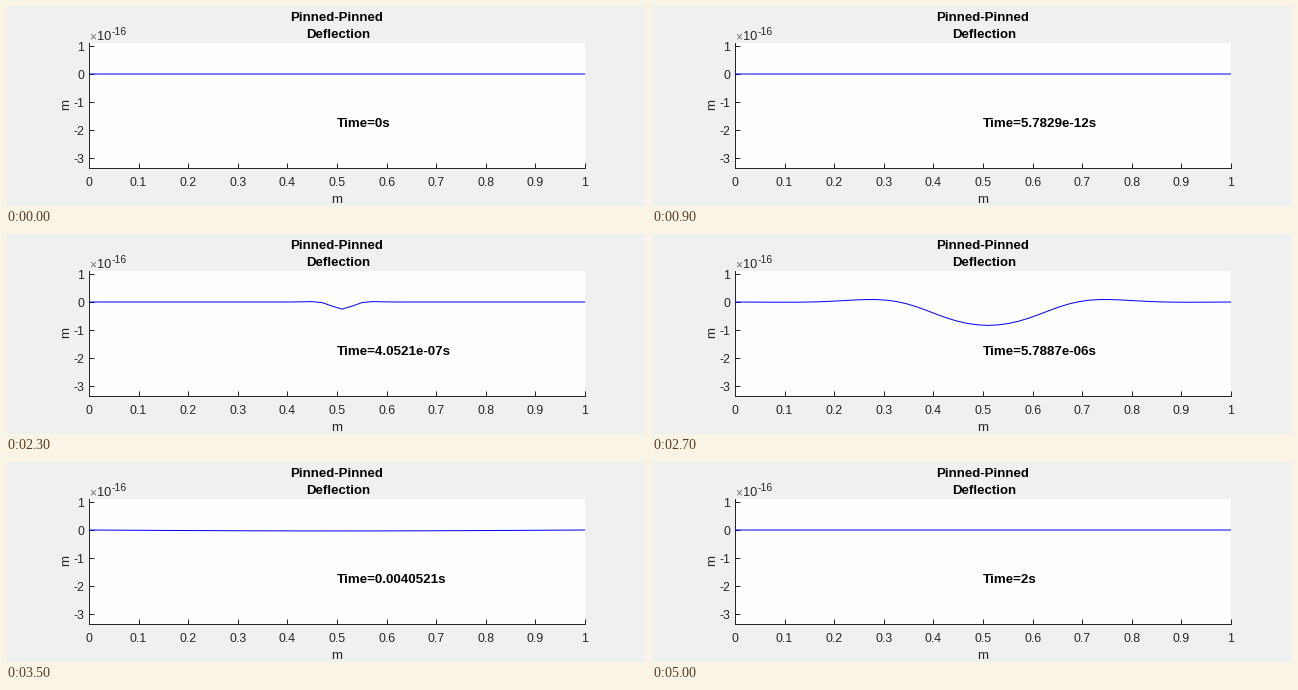
A matplotlib script that plays this animation: 640 by 200 pixels, repeating every 5.1 s.

```python
import numpy as np
import matplotlib.pyplot as plt
from matplotlib.animation import FuncAnimation

W, H, DPI = 640, 200, 80
PT = 72 / DPI                      # points per pixel
LEFT, RIGHT, TOP, BOTTOM = 83, 579, 37, 162
ZERO, UNIT = 68, 28.1              # pixel row of y = 0, pixels per 1e-16 m
INK = (0.15, 0.15, 0.15)

FRAMES = 51
T_END, MAX_STEP = 2.0, 0.2
FIRST_STEP = 1.736605e-14
KAPPA = 0.185                      # first order NDF coefficient
NODES, HIT = 50, 25
OMEGA_1 = 1.64 / 1.7366e-4         # lowest angular frequency

plt.rcParams.update({
    "font.family": "Liberation Sans",
    "text.kerning_factor": 6,
    "axes.unicode_minus": False,
})


def simulate():
    """Struck pinned beam, solved per mode with a stiff variable-step scheme."""
    x = np.linspace(0, 1, NODES)
    mode = np.arange(1, NODES - 1)
    stiff = np.sin(mode * np.pi * x[1] / 2) ** 2
    omega = OMEGA_1 * stiff / stiff[0]
    shape = np.sin(np.pi * np.outer(x, mode))
    weight = shape[HIT] / omega

    t, step = 0.0, FIRST_STEP
    z = np.ones(len(mode), complex)          # velocity + i * omega * deflection
    diff = 1j * step * omega * z
    times, curves = [t], [np.zeros(NODES)]
    for n in range(1, FRAMES):
        new = min(FIRST_STEP * 10.0 ** ((n - 1) // 3), MAX_STEP, T_END - t)
        diff = diff * (new / step)
        step = new
        z_next = ((1 + KAPPA) * z + KAPPA * diff) / (1 + KAPPA - 1j * step * omega)
        diff, z = z_next - z, z_next
        t += step
        times.append(t)
        curves.append(-shape @ (weight * z.imag))
    curves = np.array(curves)
    depth = (BOTTOM + 0.5 - ZERO) / UNIT
    return x, times, curves * (depth / -curves.min())


x, times, curves = simulate()

fig = plt.figure(figsize=(W / DPI, H / DPI), dpi=DPI, facecolor="#f0f0f0")
ax = fig.add_axes([LEFT / W, 1 - BOTTOM / H, (RIGHT - LEFT) / W, (BOTTOM - TOP) / H],
                  facecolor="#fefefe")
ax.set_xlim(0, 1)
ax.set_ylim((ZERO - BOTTOM) / UNIT, (ZERO - TOP) / UNIT)
ax.set_xticks(np.arange(11) / 10)
ax.set_yticks(range(-3, 2))
ax.tick_params(direction="in", length=5 * PT, width=PT, color=INK,
               labelbottom=False, labelleft=False)
for side in ("top", "right"):
    ax.spines[side].set_visible(False)
for side in ("left", "bottom"):
    ax.spines[side].set(color=INK, linewidth=PT)


def label(px, py, text, size, **style):
    """Text with its baseline at a pixel position measured from the top left."""
    style = {"color": INK, "ha": "center", "va": "baseline", **style}
    return fig.text(px / W, 1 - py / H, text, fontsize=size * PT, **style)


for i in range(11):
    label(LEFT + (RIGHT - LEFT) * i / 10, 180, f"{i / 10:g}", 12.4)
for v in range(-3, 2):
    label(78, round(ZERO - UNIT * v + 4.8), str(v), 12.4, ha="right")
label(83.5, 34, "×", 12, ha="left", color="#707070")
label(91.5, 34, "10", 12.8, ha="left")
label(106, 29, "-16", 10.4, ha="left")
label(330.6, 197, "m", 13.2)
label(63, 99, "m", 13.2, rotation=90, rotation_mode="anchor")

bold = {"color": "black", "weight": "bold"}
label(330.5, 15, "Pinned-Pinned", 13.2, **bold)
label(332.3, 32, "Deflection", 13.2, **bold)
clock = label(331, 121, "", 13.33, ha="left", **bold)

beam, = ax.plot(x, curves[0], color="blue", lw=PT, snap=False,
                solid_capstyle="butt", clip_on=False, zorder=3)


def update(n):
    beam.set_ydata(curves[n])
    clock.set_text(f"Time={times[n]:.5g}s")
    return beam, clock


anim = FuncAnimation(fig, update, frames=FRAMES, interval=100,
                     repeat=True, repeat_delay=0, blit=False)
plt.show()
```
